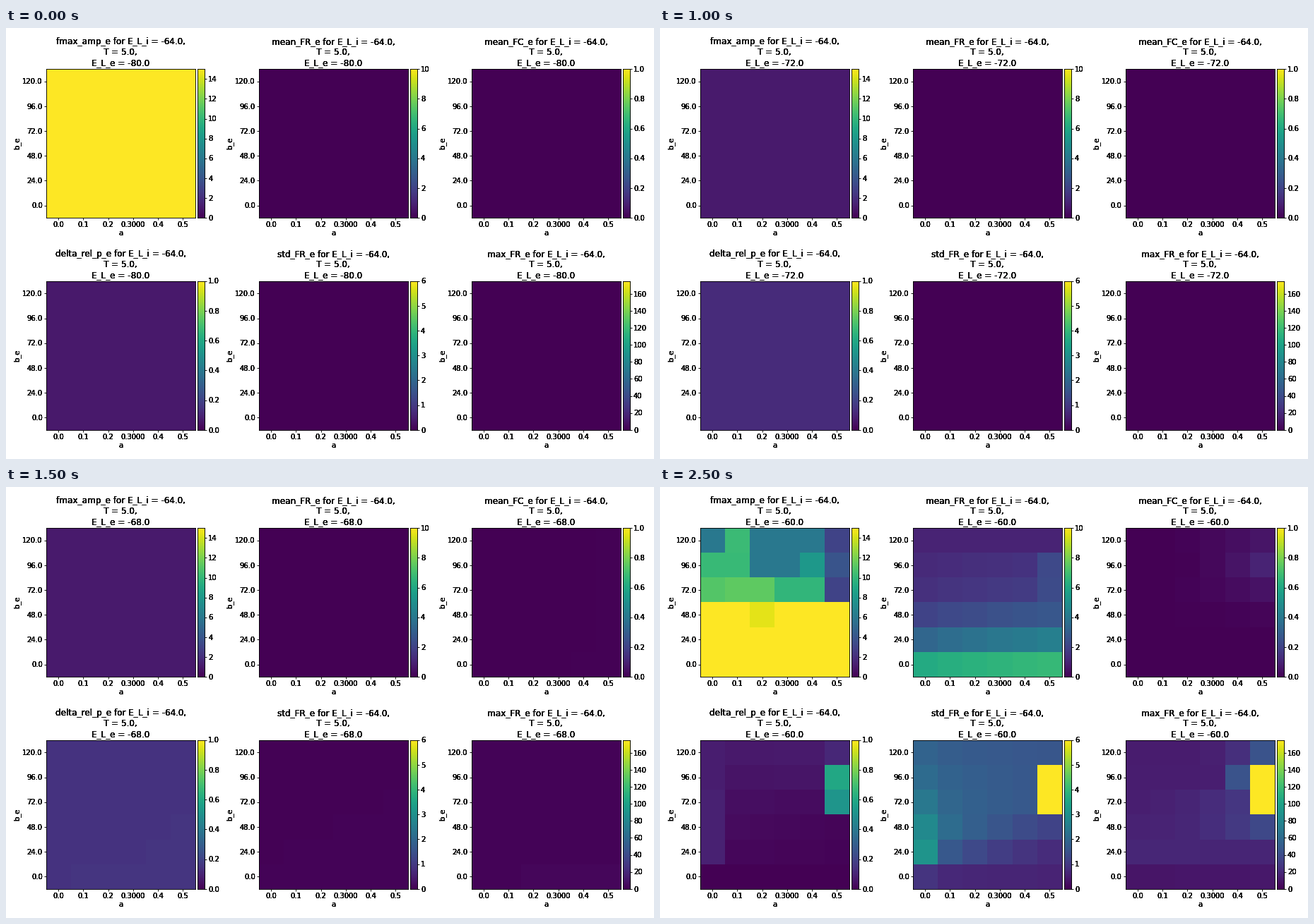
A matplotlib script for the animation above (3000 ms loop, 917x611 px).

```python
import numpy as np
import matplotlib.pyplot as plt
from matplotlib.animation import FuncAnimation
from matplotlib.text import Text
from matplotlib.transforms import IdentityTransform

W, H, DPI = 917, 611, 64
PX = 72 / DPI                      # points per pixel
SIDE, PITCH = 211, 300.9
N = 6
CELL = SIDE / N
LEFT, TOP = 56.7, 58.2
ROW_PITCH = 300.6

plt.rcParams["font.family"] = "DejaVu Sans"
fig = plt.figure(figsize=(W / DPI, H / DPI), dpi=DPI, facecolor="white")


class InkText(Text):
    """Text drawn in several passes, which hardens its soft edges."""

    def draw(self, renderer):
        for _ in range(5):
            super().draw(renderer)


def label(x, y, text, size=10, **kw):
    """Place text by pixel, y counted down from the top of the stage."""
    return fig.add_artist(InkText(x, H - y, text, fontsize=size * PX, color="black",
                                  transform=IdentityTransform(), **kw))


def make_axes(x, y, w, h):
    ax = fig.add_axes([x / W, 1 - (y + h) / H, w / W, h / H])
    for spine in ax.spines.values():
        spine.set_linewidth(0.9 * PX)
    ax.tick_params(length=2.8 * PX, width=0.9 * PX,
                   labelleft=False, labelbottom=False, labelright=False)
    return ax


# Grids: rows run from b_e = 120 at the top to b_e = 0, columns from a = 0 to 0.5.

def flat(value, *patches):
    return patch(np.full((N, N), float(value)), patches)


def ramp(lo, hi, *patches, bend=1):
    """Each row runs from lo to hi; bend shapes the way there."""
    lo, hi = (np.array(v, float)[:, None] for v in (lo, hi))
    t = (np.arange(N) / (N - 1)) ** np.reshape(bend, (-1, 1))
    return patch(lo + (hi - lo) * t, patches)


def patch(grid, patches):
    for cells, value in patches:
        grid[cells] = value
    return grid


s = np.s_
rows, cols = np.indices((N, N))

fmax_amp = [
    flat(15), flat(10.2), flat(1.1), flat(1.1),
    flat(5.05, (s[0, 0], 3.3), (s[0, 2], 4.2), (s[:4, 4:], 2.6), (s[0, 5], 4.9),
         (s[1, 5], 3.3), (s[2:4, 0], 7.5), (s[2, 2], 6), (s[3, 2:4], 10.2),
         (s[3, 4:], 3.2), (s[4], 10.1), (s[4, 2], 7.4), (s[4, 5], 11.7), (s[5], 15)),
    flat(15, (s[:2], 6), (s[0, 1], 10.2), (s[1, :2], 10.1), (s[1, 4], 8),
         (s[2], 11), (s[2, 1:3], 11.3), (s[2, 3:5], 9.9), (s[:3, 5], 3),
         (s[1, 5], 3.9), (s[3, 2], 14.4)),
]

mean_fr = [flat(0)] * 4 + [
    ramp([.3, .35, .4, .6, 1, 2.4], [.45, .55, .65, 1.4, 2.75, 4.75],
         (s[0, 5], .8), (s[1, 5], 1.2), (s[2, 5], 1.5), bend=[1, 1, 1, 1, .75, .45]),
    ramp([1, 1.2, 1.4, 2, 3.3, 6.1], [1, 1.5, 1.8, 2.7, 4.3, 6.7],
         (s[1, 5], 2.2), (s[2, 5], 2.3), bend=.8),
]

mean_fc = [flat(0)] * 3 + [
    flat(0, (s[:5, 5], .005), (s[5, 4:], .005)),
    ramp([0] * N, [.055, .085, .085, .08, .014, .004], bend=[2, 3, 3, 3, 1, 1]),
    ramp([0] * N, [.055, .1, .05, .013, .002, 0], bend=[2, 3, 2, 1, 1, 1]),
]

delta_rel = [
    flat(.07),
    flat(.096, (cols > rows, .091)),
    flat(.122),
    flat(.148, (s[5, 1:], .155), (s[4, 4:], .155), (s[3, 5], .155)),
    ramp([.12, .125, .112, .11, .045, .01], [.25, .25, .25, .14, .06, .005],
         (s[4:, 0], .1), (s[0, 5], .65), (s[1, 5], .6), (s[2, 5], .5), (s[3, 5], .22),
         bend=[3, 4, 4, 4, 1, 1]),
    ramp([.065, .05, .04, .035, .02, 0], [.075, .06, .03, .015, .01, 0],
         (s[:2, 0], .08), (s[2:5, 0], .09), (s[0, 5], .11),
         (s[1, 5], .6), (s[2, 5], .52)),
]

std_fr = [flat(0)] * 3 + [
    flat(.03, (s[5, :], .055), (s[4, 1:], .055), (s[3, 3:], .055), (s[2, 5], .055)),
    ramp([1.05, 1.12, 1.2, 1.48, 2.05, 3], [1.2, 1.3, 1.38, 1.5, 1.4, .75],
         (s[:3, 5], 6), bend=[2, 2, 2, 1, 1, .4]),
    ramp([1.9, 2.1, 2.4, 2.85, 3.1, .9], [1.6, 1.6, 1.6, 1.2, .75, .6],
         (s[1:3, 5], 6), bend=[.5, .5, .4, .5, .3, .2]),
]

max_fr = [flat(0)] * 3 + [
    flat(2, (s[5, 2:], 3)),
    ramp([8, 8, 8, 10, 11, 14], [14, 15, 16, 26, 42, 13],
         (s[:3, 5], 175), (s[4, 3:5], [22, 36]), bend=[2, 2, 2, 3, 3, 1]),
    ramp([13, 14, 15, 17, 19, 10], [45, 22, 35, 38, 18, 11],
         (s[1, 4], 45), (s[1:3, 5], 175), bend=[5, 4, 2, 2.5, 1, 1]),
]

# name, grids, colour limit, colour bar ticks, tick format
PANELS = [
    ("fmax_amp_e", fmax_amp, 15, np.arange(0, 15, 2), "{:.0f}"),
    ("mean_FR_e", mean_fr, 10, np.arange(0, 11, 2), "{:.0f}"),
    ("mean_FC_e", mean_fc, 1, np.arange(6) / 5, "{:.1f}"),
    ("delta_rel_p_e", delta_rel, 1, np.arange(6) / 5, "{:.1f}"),
    ("std_FR_e", std_fr, 6, np.arange(7), "{:.0f}"),
    ("max_FR_e", max_fr, 175, np.arange(0, 161, 20), "{:.0f}"),
]


def build(i, name, grids, vmax, ticks, fmt):
    x, y = LEFT + PITCH * (i % 3), TOP + ROW_PITCH * (i // 3)
    bottom, middle = y + SIDE, x + SIDE / 2

    ax = make_axes(x, y, SIDE, SIDE)
    image = ax.imshow(grids[0], cmap="viridis", vmin=0, vmax=vmax,
                      interpolation="nearest", aspect="auto")
    ax.set_xticks(range(N))
    ax.set_yticks(range(N))
    for k in range(N):
        mid = (k + 0.5) * CELL
        text = "0.3000" if k == 3 else f"{k / 10:.1f}"
        label(x + mid, bottom + 13, text, ha="center")
        label(x - 4.9, bottom - mid + 3.7, f"{24 * k:.1f}", ha="right")
    label(middle, bottom + 24.8, "a", ha="center")
    label(x - 41.3, y + SIDE / 2, "b_e", rotation=90, ha="center", va="center")

    bar = make_axes(x + 214.1, y, 10.6, SIDE)
    bar.imshow(np.arange(256)[:, None], cmap="viridis", origin="lower",
               extent=(0, 1, 0, vmax), interpolation="nearest", aspect="auto")
    bar.yaxis.tick_right()
    bar.tick_params(labelright=False)
    bar.set_xticks([])
    bar.set_yticks(ticks)
    for v in ticks:
        label(x + 229.4, bottom - SIDE * v / vmax + 3.7, fmt.format(v))

    title = label(middle, y - 5, "", size=12, ha="center", va="baseline")
    return name, grids, image, title


panels = [build(i, *p) for i, p in enumerate(PANELS)]


def update(step):
    e_l = -80 + 4 * step
    for name, grids, image, title in panels:
        image.set_data(grids[step])
        title.set_text(f"{name} for E_L_i = -64.0,\nT = 5.0,\nE_L_e = {e_l:.1f}")


anim = FuncAnimation(fig, update, frames=6, interval=500, repeat=True, repeat_delay=0)
plt.show()
```
